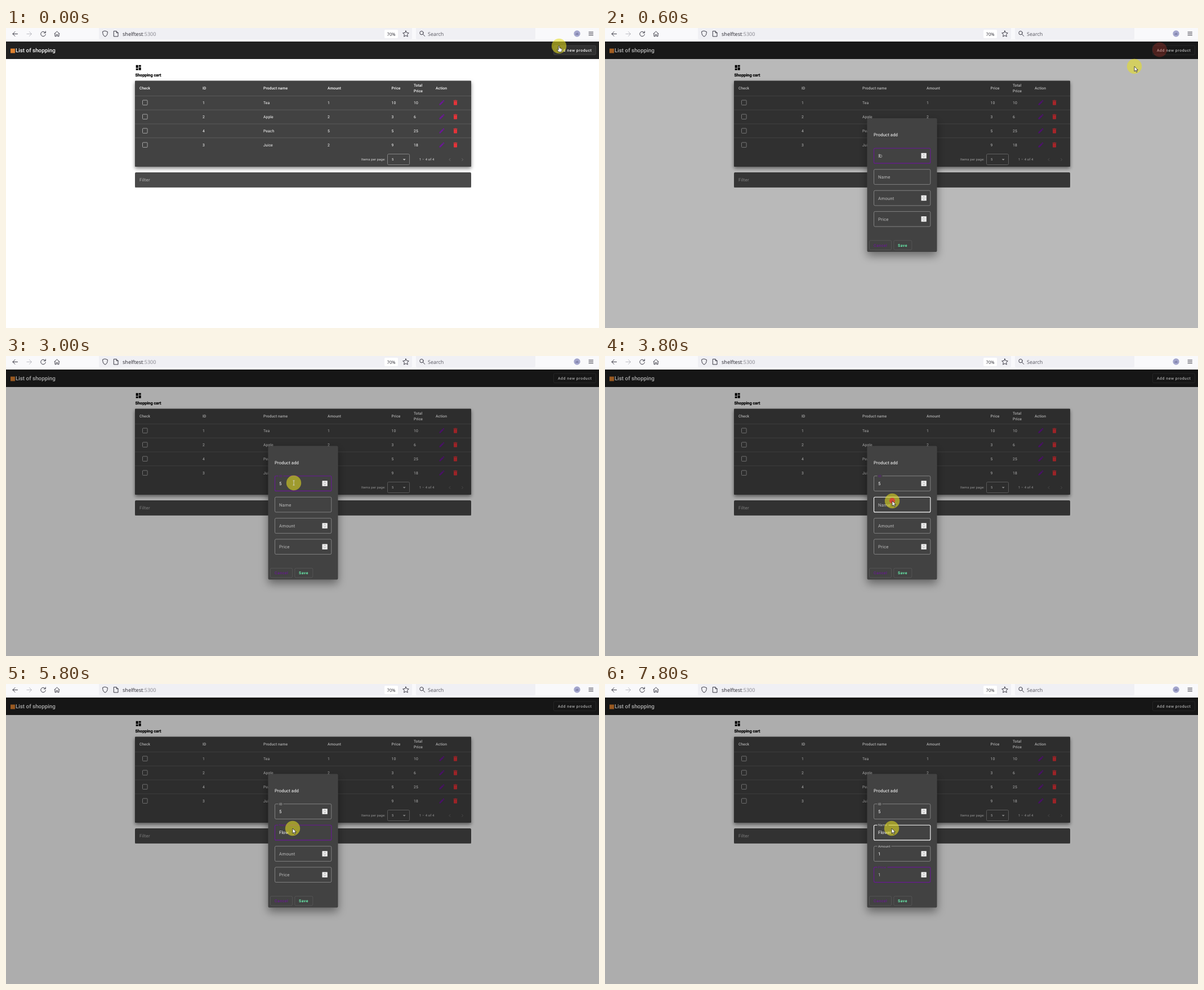
Animation of 1053 by 532 pixels, one loop 8 s. Source, as an HTML page:

```html
<!DOCTYPE html>
<html lang="en">
<head>
<meta charset="utf-8">
<title>Shopping list</title>
<style>
html, body { margin: 0; width: 100%; height: 100%; overflow: hidden; background: #fff; }
svg { display: block; width: 1053px; height: 532px; font-family: Roboto, sans-serif; text-rendering: geometricPrecision; }
.ui { font-family: "Open Sans", "Noto Sans", sans-serif; }
.icon { fill: none; stroke: #3a3944; stroke-width: 1; stroke-linecap: round; stroke-linejoin: round; }
</style>
</head>
<body>
<svg id="stage" viewBox="0 0 1053 532">
  <defs>
    <filter id="shade" x="-20%" y="-20%" width="140%" height="150%">
      <feDropShadow dx="0" dy="3" stdDeviation="3" flood-color="#000" flood-opacity=".5"/>
    </filter>
    <filter id="deep" x="-40%" y="-20%" width="180%" height="150%">
      <feDropShadow dx="0" dy="7" stdDeviation="8" flood-color="#000" flood-opacity=".42"/>
    </filter>
    <linearGradient id="press">
      <stop offset="0" stop-color="#555"/><stop offset=".74" stop-color="#555"/>
      <stop offset=".8" stop-color="#424242"/><stop offset="1" stop-color="#424242"/>
    </linearGradient>
  </defs>
  <g id="browser"></g>
  <g id="page"></g>
  <rect id="veil" y="24" width="1053" height="508"/>
  <g id="dialog"></g>
  <g id="pointer"></g>
</svg>
<script>
const LOOP = 8000, STEP = 200;
const PURPLE = '#6a1796', SOFT = 'rgba(255,255,255,.68)', LINE = 'rgba(255,255,255,.12)';
const $ = id => document.getElementById(id);

const text = (x, y, s, size, fill = '#fff', more = '') =>
  `<text x="${x}" y="${y}" font-size="${size}" fill="${fill}" ${more}>${s}</text>`;
const box = (x, y, w, h, fill, r = 0, more = '') =>
  `<rect x="${x}" y="${y}" width="${w}" height="${h}" rx="${r}" fill="${fill}" ${more}/>`;
const frame = (x, y, w, h, stroke, r = 2, width = 1) =>
  box(x, y, w, h, 'none', r, `stroke="${stroke}" stroke-width="${width}"`);
const path = (d, more = '') => `<path d="${d}" ${more}/>`;
const glyph = (x, y, fill, d) =>
  path(d, `fill="${fill}" transform="translate(${x - 6} ${y - 6}) scale(.5)"`);
const MEDIUM = 'font-weight="500" letter-spacing=".1"';
const BUTTON = 'font-weight="500" letter-spacing=".6"';

const BIN = 'M6 19c0 1.1.9 2 2 2h8c1.1 0 2-.9 2-2V7H6zM19 4h-3.5l-1-1h-5l-1 1H5v2h14z';
const PEN = 'M3 17.25V21h3.75L17.81 9.94l-3.75-3.75zM20.71 7.04a1 1 0 0 0 0-1.41l-2.34-2.34a1 1 0 0 0-1.41 0l-1.83 1.83 3.75 3.75z';
const TILES = 'M3 13h8V3H3zm0 8h8v-6H3zm10 0h8V11h-8zm0-18v6h8V3z';

function drawBrowser() {
  const icons = [
    'M20.5 10.5h-8.5m4-4l-4 4 4 4',
    'M69.7 8.2a4.3 4.3 0 1 0 .6 3.2M70.3 5.8v3h-3',
    'M86 10.2l4.5-4.2 4.5 4.2M87 9.6v5.2h2.3v-3h2.4v3h2.3V9.6',
    'M176 5.2l4.4 1.5c0 4.500-1.200 7-4.400 8.600-3.200-1.600-4.400-4.100-4.400-8.600z',
    'M191.700 5.500h4.300l3 3v6.500h-7.300zM196 5.500v3h3',
    'M710 5l1.600 3.400 3.700.5-2.700 2.600.7 3.700-3.300-1.800-3.300 1.800.7-3.700-2.700-2.600 3.700-.5z',
    'M1035 7.200h7.500m-7.500 2.800h7.500m-7.500 2.800h7.500',
    'M740.700 11.300l3 3.200'
  ];
  $('browser').innerHTML =
    box(0, 0, 1053, 24, '#f9f9fb') +
    box(165, -4, 556, 24, '#f0f0f4', 2) + box(728, -4, 212, 24, '#f0f0f4', 2) +
    icons.map(d => path(d, 'class="icon"')).join('') +
    path('M37 10.500h8.500m-4-4l4 4-4 4', 'class="icon" style="stroke:#bdbdc3"') +
    '<circle cx="738" cy="8.700" r="3.200" class="icon"/>' +
    `<g class="ui">${text(207, 14.3, 'shelftest<tspan fill="#85848c">:5300</tspan>', 9.1, '#25242c')}` +
    box(672, 3, 24, 15, '#fff', 2) + text(676.5, 13.8, '70%', 7.7, '#25242c') +
    text(749, 14.3, 'Search', 9, '#55545d') +
    '<circle cx="1014" cy="10" r="5.700" fill="#a3a5cc"/>' +
    text(1014, 11.700, 'ab', 4.700, '#4c4d78', 'text-anchor="middle"') + '</g>';
}

function drawPage() {
  const cols = [237, 349, 457, 571, 684.5, 724];
  const rows = [[1, 'Tea', 1, 10, 10], [2, 'Apple', 2, 3, 6], [4, 'Peach', 5, 5, 25], [3, 'Juice', 2, 9, 18]];
  const heads = ['Check', 'ID', 'Product name', 'Amount', 'Price'];
  const body = rows.map((row, i) => {
    const y = 132.2 + i * 25;
    return frame(242.5, y - 4.2, 8.6, 8.6, '#a5a5a5', 1) +
      row.map((v, k) => text(cols[k + 1], y + 2.4, v, 6.8, '#fff', 'letter-spacing=".1"')).join('') +
      glyph(774, y, PURPLE, PEN) + glyph(798, y, '#e53339', BIN) +
      box(229, 120 + i * 24.8, 597, .8, 'rgba(255,255,255,.16)');
  }).join('');
  $('page').innerHTML =
    box(0, 24, 1053, 31, '#212121') +
    box(8, 36.5, 8, 8, '#e0822f') +
    text(17, 43.2, 'List of shopping', 9.8, '#fff', 'font-weight="500"') +
    '<g id="add"></g>' +
    glyph(235.2, 70.2, '#000', TILES) +
    text(229.5, 85.5, 'Shopping cart', 7.3, '#000', 'font-weight="700" stroke="#000" stroke-width=".2"') +
    box(229, 93.5, 597, 152.5, '#424242', 1, 'filter="url(#shade)"') +
    heads.map((h, i) => text(cols[i], 108.8, h, 6.7, '#fff', MEDIUM)).join('') +
    text(724, 103.6, 'Total', 6.7, '#fff', MEDIUM) + text(724, 114.2, 'Price', 6.7, '#fff', MEDIUM) +
    text(763, 108.8, 'Action', 6.7, '#fff', MEDIUM) + body +
    text(631, 235.4, 'Items per page:', 5.8, '#ddd', 'letter-spacing=".19"') +
    frame(677.5, 223.5, 39, 19, '#858585') + text(685, 235.4, '5', 5.8) +
    path('M704.700 232.200h5l-2.500 2.600z', 'fill="#ccc"') +
    text(734, 235.2, '1 – 4 of 4', 5.8, '#ddd', 'letter-spacing=".19"') +
    path('M789 231.200l-2 2.200 2 2.200M809.500 231.200l2 2.200-2 2.200', 'fill="none" stroke="#777" stroke-width=".8"') +
    box(229, 256, 597, 27, '#4a4a4a', 2) + box(229, 282.3, 597, .7, '#777') +
    text(237, 271.9, 'Filter', 7.75, '#b7b7b7', 'letter-spacing=".24"');
}

function drawAdd(t) {
  const fill = t < 400 ? '#303030' : t < 600 ? 'url(#press)' : 'none';
  $('add').innerHTML = box(972.5, 31, 75, 16.5, fill, 2, `stroke="${LINE}" stroke-width=".8"`) +
    text(980, 41.9, 'Add new product', 6.8, '#fff', BUTTON);
}

const fields = [
  { label: 'ID', y: 212.7, gap: 9, hint: '1', from: 600, lift: 800, to: 3800, value: t => t < 2800 ? '' : '5' },
  { label: 'Name', y: 250.2, gap: 20, hint: '', from: 4000, lift: 4000, to: 6600,
    value: t => 'Flower'.slice(0, Math.max(0, (t - 5000) / STEP)) },
  { label: 'Amount', y: 287.7, gap: 25, hint: '1', from: 6600, lift: 6800, to: 7600, value: t => t < 7200 ? '' : '1' },
  { label: 'Price', y: 324.9, gap: 18, hint: '1', from: 7600, lift: 7800, to: LOOP, value: () => '' }
];

function drawField(f, t) {
  const focus = t >= f.from && t < f.to, up = t >= f.lift;
  const name = f.label === 'Name', hover = name && t >= 3600;
  const stroke = focus ? PURPLE : hover ? '#fff' : '#929292';
  const value = f.value(t), fade = t === f.to;
  let s = frame(477.5, f.y, 100.3, 26.7, stroke, 2, focus || hover ? 1.1 : .8);
  if (up) {
    s += box(483.5, f.y - 1, f.gap, 2, '#424242') +
      text(485, f.y + 2, f.label, 5.8, focus || fade ? PURPLE : '#c4c4c4', 'letter-spacing=".18"');
  } else {
    s += text(485, f.y + 16.3, f.label, 7.75, '#bbb', 'letter-spacing=".2"');
  }
  if (value) s += text(485, f.y + 15.9, value, 7.75, '#fff', 'letter-spacing=".1"');
  else if (focus) s += text(485, f.y + 15.9, f.hint, 7.75, SOFT);
  if (!name) {
    const y = f.y + 8.5;
    s += box(561.5, y, 9.3, 9.6, '#f0f0f0', .5) +
      path(`M564.500 ${y + 3.700}l1.700-1.700 1.700 1.700M564.500 ${y + 5.900}l1.700 1.700 1.700-1.700`,
        'fill="none" stroke="#777" stroke-width=".7"') +
      box(562, y + 4.6, 8.3, .4, '#c8c8c8');
  }
  return s;
}

function drawDialog(t) {
  $('veil').setAttribute('fill-opacity', t < 600 ? 0 : t < 800 ? .275 : .32);
  $('dialog').innerHTML = t < 600 ? '' :
    `<g transform="translate(0 ${t < 800 ? .5 : 0})">` +
    box(465.5, 159.5, 124, 237, '#424242', 2, 'filter="url(#deep)"') +
    text(477, 191.8, 'Product add', 7.75, '#fff', 'letter-spacing=".1"') +
    fields.map(f => drawField(f, t)).join('') +
    frame(469.5, 376.3, 39, 16.5, LINE, 2, .8) + text(477, 387, 'Cancel', 6.8, PURPLE, BUTTON) +
    frame(512.8, 376.3, 32, 16.5, LINE, 2, .8) +
    text(520, 387, 'Save', 6.8, '#69f0ae', 'font-weight="700" letter-spacing=".5"') + '</g>';
}

// time, x, y
const track = [
  [0, 982, 32], [400, 985, 37], [600, 940, 68], [800, 800, 122], [1000, 620, 188],
  [1200, 530, 219], [1400, 511, 225], [3200, 511, 225], [3600, 510.5, 248], [3800, 510, 257],
  [4000, 509, 256], [LOOP, 509, 256]
];
// time, x, y, first radius
const clicks = [[400, 985, 38.5, 7], [1800, 511, 225.5, 7], [3800, 510, 256.5, 5]];

function place(t) {
  const i = Math.max(1, track.findIndex(k => k[0] >= t));
  const [a, x0, y0] = track[i - 1], [b, x1, y1] = track[i];
  const p = (t - a) / (b - a);
  return [x0 + (x1 - x0) * p, y0 + (y1 - y0) * p];
}

function drawPointer(t) {
  const [x, y] = place(t);
  let s = `<circle cx="${x}" cy="${y}" r="13.200" fill="#e8e01e" fill-opacity=".56"/>`;
  for (const [at, cx, cy, r] of clicks) {
    const age = t - at;
    if (age === 0) s += `<circle cx="${cx}" cy="${cy}" r="${r}" fill="#dc3a34" fill-opacity=".86"/>`;
    if (age === STEP) s += `<circle cx="${cx}" cy="${cy}" r="13" fill="#d83a30" fill-opacity=".28"/>`;
  }
  const ink = 'fill="#fff" stroke="#222" stroke-width=".8" stroke-linejoin="round"';
  let shape;
  if (t < 600) {
    shape = path('M-1 0q1-1.200 2 0v3.600l3 .6q1.500.4 1.300 2l-.7 4.300h-5.100l-3-4q.5-1.200 2.500.2z', ink);
  } else if (t >= 1400 && t < 3600) {
    shape = path('M-1.500-4h3m-1.500 0v8m-1.500 0h3', 'fill="none" stroke="#ddd" stroke-width=".8"');
  } else {
    shape = path('M0 0v9l2.100-1.900 1.500 3.200 1.500-.7-1.500-3.100h2.800z', ink);
  }
  $('pointer').innerHTML = s + `<g transform="translate(${x} ${y})">${shape}</g>`;
}

let last = -1;
function render(now) {
  const t = Math.floor((now % LOOP) / STEP) * STEP;
  if (t !== last) {
    last = t;
    drawAdd(t);
    drawDialog(t);
    drawPointer(t);
  }
}

drawBrowser();
drawPage();
render(0);
let start;
function tick(now) {
  start ??= now;
  render(now - start);
  requestAnimationFrame(tick);
}
requestAnimationFrame(tick);
</script>
</body>
</html>
```
